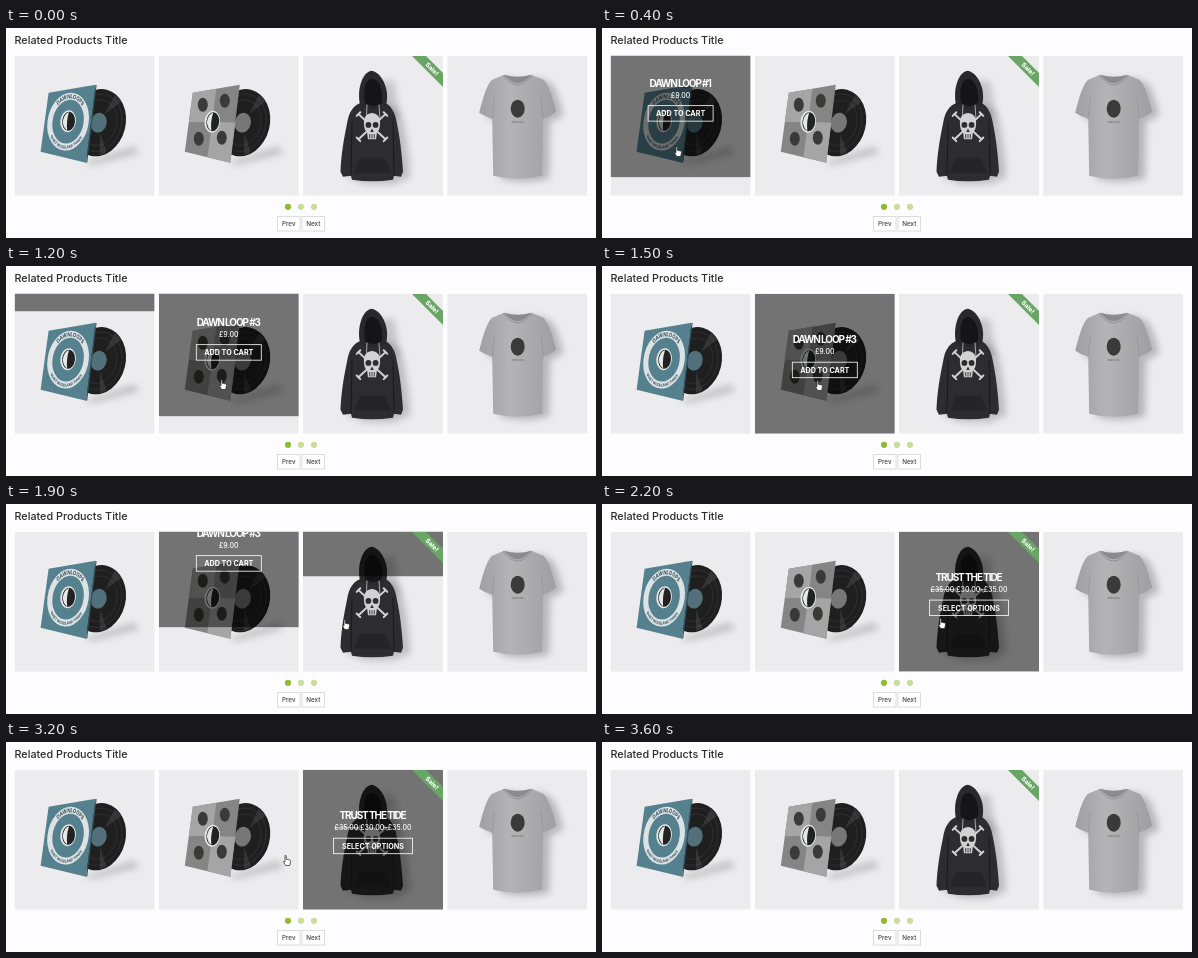
Animation, 590 px wide and 210 px high, one loop 4100 ms. Source, as an HTML page:

```html
<!DOCTYPE html>
<html lang="en">
<head>
<meta charset="utf-8">
<title>Related products</title>
<style>
  html, body { margin: 0; width: 100%; height: 100%; overflow: hidden; background: #fdfcfe; }
  svg { display: block; font-family: Inter, sans-serif; }
  .overlay { fill: #fff; text-anchor: middle; }
  .name { font-size: 10px; font-weight: 700; letter-spacing: -1.1px; }
  .price { font-size: 7px; font-weight: 500; }
  .action { font-size: 7.2px; font-weight: 700; }
  .nav { font-size: 6.3px; font-weight: 500; fill: #444; text-anchor: middle; }
</style>
</head>
<body>
<svg id="stage" width="590" height="210" viewBox="0 0 590 210"></svg>
<script>
const LOOP = 4100, STEP = 100, SLIDE = 400, SIZE = 140;

// Product art, in card coordinates (140 x 140).
const shadow = (outline, opacity) =>
  `<path d="${outline}" transform="translate(7 3)" fill="#555" opacity="${opacity}" filter="url(#soft)"/>`;

const sleeve = "M34 37 L81 29 L71.500 107 L26 96Z";

const record = (cover, label) => `
  ${shadow("M62 104 L112 88 L118 94 L72 106Z", .3)}
  <g transform="translate(84 67) rotate(14)">
    <ellipse rx="27" ry="34" fill="#1f1f20"/>
    <g fill="none" stroke="#3d3d3e" stroke-width=".5">
      <ellipse rx="23" ry="29"/><ellipse rx="18" ry="23"/>
    </g>
    <path d="M4 -10 L9 -31 L17 -26Z M4 10 L15 27 L9 31Z" fill="#888" opacity=".2"/>
    <ellipse rx="8" ry="10" fill="${label}"/>
  </g>
  ${cover}`;

const hole = (x, y) => `
  <g transform="translate(${x} ${y}) rotate(6)">
    <ellipse rx="7.800" ry="11" fill="#e6e8e8"/>
    <ellipse cx=".5" rx="6.400" ry="9.600" fill="#222"/>
    <path d="M0 -9.300 Q-5 -7 -5.300 1 Q-4 7 0 9.300 Q-2 0 0 -9.300Z" fill="#e6e8e8"/>
  </g>`;

const tealCover = `
  <path d="${sleeve}" fill="#55808e"/>
  <path d="M81 29 L71.500 107 L72.700 106.500 L82 29.500Z" fill="#35505a"/>
  <g transform="matrix(.84 .03 -.14 1.18 53.500 66)">
    <circle r="21.500" fill="none" stroke="#dde3e5" stroke-width="6"/>
    <path id="upper" d="M-19.800 0 A19.800 19.800 0 0 1 19.800 0" fill="none"/>
    <path id="lower" d="M-22.800 0 A22.800 22.800 0 0 0 22.800 0" fill="none"/>
    <g fill="#36535d" text-anchor="middle" font-weight="700">
      <text font-size="5"><textPath href="#upper" startOffset="50%">DAWNLOOPS</textPath></text>
      <text font-size="3.400"><textPath href="#lower" startOffset="50%">QUIET WOODLAND TUNES</textPath></text>
    </g>
  </g>
  ${hole(53.5, 65.5)}`;

const spots = [[44, 49], [66, 45], [40, 83], [63, 82]];
const greyCover = `
  <path d="${sleeve}" fill="#858586"/>
  <path d="M34 37 L57.500 33 L53.500 66 L30 66.500Z M53.500 66 L76.500 67 L71.500 107 L48.500 101.500Z" fill="#a5a5a6"/>
  ${spots.map(([x, y]) => `<ellipse cx="${x}" cy="${y}" rx="5" ry="7" fill="#3a3b38"/>`).join("")}
  ${hole(53.5, 66)}`;

const hoodieBody = "M58 47 C50 50 46 56 44 68 C41 82 38 100 37.500 116 L40 121 L48 120 L49 124 Q69 127 90 124 L91 120 L98 121 L100 116 C99 100 97 82 94 68 C92 56 88 50 82 47Z";
const hoodie = `
  ${shadow(hoodieBody, .3)}${shadow("M64 22 L84 22 L90 60 L60 60Z", .25)}
  <path d="${hoodieBody}" fill="#2d2d2f"/>
  <path d="M49 66 L48 120 M90 66 L91 120" stroke="#1a1a1c" fill="none"/>
  <path d="M57 49 C54 36 58 17 68.500 15 C80 17 87 36 83 49 Q71 58 57 49Z" fill="#29292b"/>
  <path d="M62 47 C60 34 62 24 69 23 C77 24 80 36 79 47 Q70 54 62 47Z" fill="#151517"/>
  <path d="M64 49 L63 70 M76 49 L77 64" stroke="#c8c8c8" stroke-width=".8"/>
  <path d="M57 102 L82 102 L88 117 L51 117Z" fill="#252527"/>
  <g transform="translate(69 71) scale(.9)">
    <g stroke="#d2d2d2" stroke-width="2.200" stroke-linecap="round">
      <path d="M-15 -14 L15 14 M15 -14 L-15 14"/>
      <path d="M-17 -12 L-13 -16 M17 -12 L13 -16 M-17 12 L-13 16 M17 12 L13 16"/>
    </g>
    <path d="M-9 -4 C-10 -19 10 -19 9 -4 Q9 4 5.500 6 L4.500 14 L-4.500 14 L-5.500 6 Q-9 4 -9 -4Z" fill="#d2d2d2"/>
    <g fill="#2d2d2f"><circle cx="-4" cy="-2" r="3.200"/><circle cx="4" cy="-2" r="3.200"/>
    <path d="M0 2 L-2 6 L2 6Z M-3 8 h1 v5 h-1Z M-.5 8 h1 v5 h-1Z M2 8 h1 v5 h-1Z"/></g>
  </g>`;

const shirtBody = "M57 19 Q70 25 84 19 L96 24 Q102 28 109 56 Q103 61 96 63 L95 120 Q70 126 46 120 L45 63 Q38 61 32 57 Q39 28 45 24Z";
const shirt = `
  ${shadow(shirtBody, .35)}
  <path d="${shirtBody}" fill="url(#cloth)"/>
  <path d="M57 19 Q70 36 84 19 Q70 23 57 19Z" fill="#8b8b8d"/>
  <path d="M56 19.500 Q70 39 85 19.500" fill="none" stroke="#919193"/>
  <path d="M45 63 L47 42 M96 63 L94 42" stroke="#929294" stroke-width=".7"/>
  <ellipse cx="70.500" cy="53" rx="7" ry="9" fill="#3a3b38"/>
  <text x="70.500" y="67" font-size="2.400" fill="#666" text-anchor="middle">dawnloops</text>`;

// hover: [pointer enters, pointer leaves] in ms
const cards = [
  { art: record(tealCover, "#52707a"), name: "DAWN LOOP #1", price: "£9.00", action: "ADD TO CART", buttonWidth: 65,
    hover: [[170, 966], [3290, 3360]] },
  { art: record(greyCover, "#777"), name: "DAWN LOOP #3", price: "£9.00", action: "ADD TO CART", buttonWidth: 65,
    hover: [[966, 1816], [3200, 3290]] },
  { art: hoodie, name: "TRUST THE TIDE",
    price: `<tspan text-decoration="line-through">£35.00</tspan> £30.00–£35.00`,
    action: "SELECT OPTIONS", buttonWidth: 79, hover: [[1816, 3200]] },
  { art: shirt, hover: [] },
];

const overlay = ({ name, price, action, buttonWidth }) => !name ? "" : `
  <g class="overlay">
    <rect width="140" height="140" fill="#000" opacity=".51"/>
    <text class="name" x="69.500" y="49.500">${name}</text>
    <text class="price" x="70" y="60.500">${price}</text>
    <rect x="${70 - buttonWidth / 2}" y="68.500" width="${buttonWidth}" height="15.500" fill="none" stroke="#fff" stroke-width=".8"/>
    <text class="action" x="70" y="79">${action}</text>
  </g>`;

const navButton = (x, label) => `
  <rect x="${x}" y="188.500" width="22.500" height="14.500" fill="#fff" stroke="#dcdcdc"/>
  <text class="nav" x="${x + 11.25}" y="198">${label}</text>`;

const stage = document.getElementById("stage");
stage.innerHTML = `
  <defs>
    <filter id="soft" x="-30%" y="-30%" width="160%" height="160%"><feGaussianBlur stdDeviation="3.500"/></filter>
    <linearGradient id="cloth"><stop stop-color="#a0a0a2"/><stop offset=".4" stop-color="#b4b4b6"/><stop offset="1" stop-color="#9f9fa1"/></linearGradient>
  </defs>
  <text x="8.500" y="16" font-size="10.800" font-weight="500" fill="#2b2b2b">Related Products Title</text>
  ${cards.map((card, i) => `
    <svg x="${8.6 + i * 144.2}" y="27.700" width="140" height="140" viewBox="0 0 140 140" overflow="hidden">
      <rect width="140" height="140" fill="#ecebed"/>${card.art}${overlay(card)}
    </svg>`).join("")}
  <path d="M406 28 H420 L437 45 V59Z" fill="#69a665"/>
  <text transform="translate(424.500 42.500) rotate(45)" font-size="6.300" font-weight="800" fill="#fff" text-anchor="middle">Sale!</text>
  ${[282, 295, 308].map((x, i) => `<circle cx="${x}" cy="178.800" r="3.100" fill="${i ? "#cadd9b" : "#8fba31"}"/>`).join("")}
  ${navButton(271.5, "Prev")}${navButton(296, "Next")}
  <path id="hand" d="M2 .5 Q3.300 .2 3.300 1.500 V4.200 L6.800 5 Q7.700 5.300 7.500 6.500 L6.700 10.500 H2.700 L.5 7 Q.3 5.800 2 6.800 V.5Z" fill="#fff" stroke="#222" stroke-width=".7"/>`;

const overlays = [...stage.querySelectorAll(".overlay")];
const hand = document.getElementById("hand");

// Pointer path: time, x, y
const path = [
  [100, 30, 140], [300, 72, 118], [800, 72, 118], [900, 135, 118], [1000, 213, 113],
  [1400, 213, 113], [1500, 213, 114], [1600, 213, 114], [1700, 232, 115], [1800, 290, 116],
  [1900, 336, 115], [2000, 336, 114], [2300, 336, 114], [2700, 380, 124], [3100, 380, 124],
  [3200, 277, 113], [3300, 140, 105], [3400, 20, 100],
];

// cubic-bezier(.25, .1, .25, 1)
function ease(x) {
  if (x <= 0) return 0;
  if (x >= 1) return 1;
  const curve = (a, b, u) => 3 * a * u * (1 - u) ** 2 + 3 * b * u * u * (1 - u) + u ** 3;
  let low = 0, high = 1;
  for (let i = 0; i < 24; i++) {
    const mid = (low + high) / 2;
    if (curve(.25, .25, mid) < x) low = mid; else high = mid;
  }
  return curve(.1, 1, low);
}

// A slide that is cut short returns in proportionally less time.
function coverage(t, [enter, leave]) {
  if (t < leave) return ease((t - enter) / SLIDE);
  const reached = ease((leave - enter) / SLIDE);
  return reached * (1 - ease((t - leave) / (SLIDE * reached)));
}

function pointerAt(t) {
  const next = path.findIndex(point => point[0] > t);
  if (next === 0) return null;
  if (next < 0) return t < 3500 ? path.at(-1).slice(1) : null;
  const [t0, x0, y0] = path[next - 1], [t1, x1, y1] = path[next];
  const k = (t - t0) / (t1 - t0);
  return [x0 + (x1 - x0) * k, y0 + (y1 - y0) * k];
}

function draw(now) {
  const t = Math.floor(now % LOOP / STEP) * STEP;
  overlays.forEach((panel, i) => {
    const shown = Math.max(...cards[i].hover.map(span => coverage(t, span)));
    panel.setAttribute("transform", `translate(0 ${SIZE * (shown - 1)})`);
    panel.setAttribute("opacity", Math.min(1, shown * 8));
  });
  const pointer = pointerAt(t);
  hand.setAttribute("visibility", pointer ? "visible" : "hidden");
  if (pointer) hand.setAttribute("transform", `translate(${pointer})`);
}

const start = performance.now();
function tick() {
  draw(performance.now() - start);
  requestAnimationFrame(tick);
}
tick();
</script>
</body>
</html>
```
